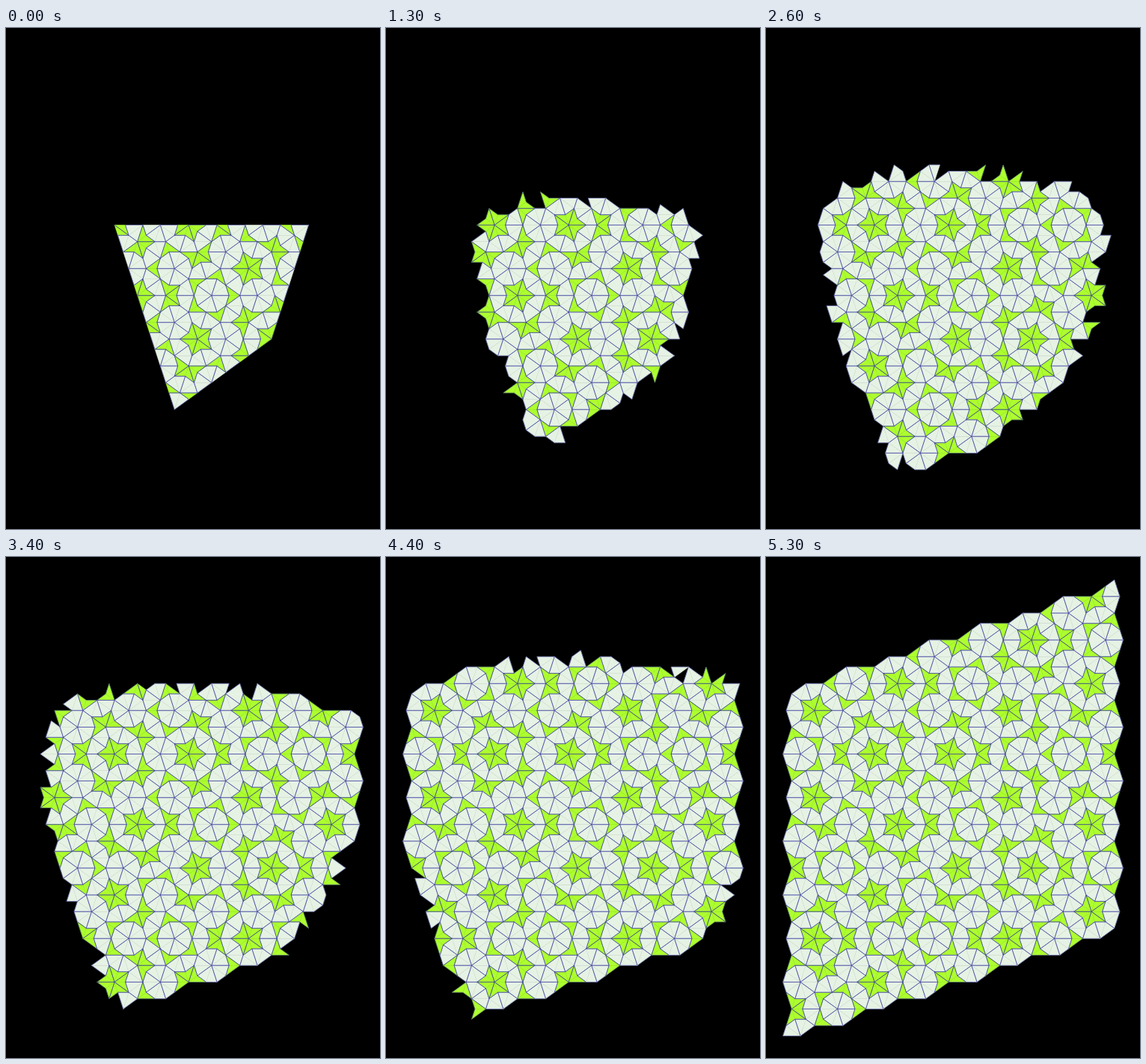
Recreate the animation shown at these times as an HTML page with a canvas. Size 500x670 px, loop 5.8 s.

```html
<!DOCTYPE html>
<html lang="en">
<head>
<meta charset="utf-8">
<title>Kite and dart tiling</title>
<style>
  html, body { margin: 0; width: 100%; height: 100%; overflow: hidden; background: #000; }
  canvas { display: block; }
</style>
</head>
<body>
<canvas id="stage" width="500" height="670"></canvas>
<script>
const ctx = document.getElementById('stage').getContext('2d');
const PHI = (1 + Math.sqrt(5)) / 2;
const CENTER = [145.1, 263.5];
const KITE_EDGE = 259.4;
const FILL = { kite: '#e5f2e4', dart: '#adff2f' };
const LOOP = 5800, HOLD = 500, STEP = 100, STEPS = 49;

const polar = (radius, degrees) => [
  CENTER[0] + radius * Math.cos(degrees * Math.PI / 180),
  CENTER[1] + radius * Math.sin(degrees * Math.PI / 180)
];
const mix = (p, q, k) => [p[0] + (q[0] - p[0]) * k, p[1] + (q[1] - p[1]) * k];

// A half tile is [kind, tip, side, axis end].
function deflate([kind, a, b, c]) {
  if (kind === 'kite') {
    const p = mix(a, b, 1 / PHI ** 2), q = mix(a, c, 1 / PHI);
    return [['dart', a, q, p], ['kite', b, p, q], ['kite', b, c, q]];
  }
  const s = mix(a, b, 1 / PHI);
  return [['kite', a, s, c], ['dart', b, c, s]];
}

function inWindow([x, y]) {
  const slanted = y + 0.325 * x;
  return x > 21 && x < 479 && slanted > 180 && slanted < 662;
}

function buildTiles() {
  const radius = KITE_EDGE * PHI ** 2;
  let halves = [];
  for (let axis = 0; axis < 360; axis += 72)
    for (const turn of [-36, 36])
      halves.push(['kite', CENTER, polar(radius, axis + turn), polar(radius, axis)]);
  for (let i = 0; i < 7; i++) halves = halves.flatMap(deflate);

  const tiles = halves
    .filter(([, ...points]) => points.every(inWindow))
    .map(([kind, a, b, c]) => ({
      kind, a, b, c,
      middle: mix(a, c, 0.5),
      centroid: mix(mix(a, c, 0.5), b, 1 / 3)
    }));

  // Both halves of a tile share the middle of its axis; keep whole tiles only.
  const key = t => t.middle.map(Math.round).join();
  const counts = {};
  for (const t of tiles) counts[key(t)] = (counts[key(t)] || 0) + 1;
  return tiles.filter(t => counts[key(t)] === 2);
}

const seedKite = [CENTER, polar(KITE_EDGE, 0), polar(KITE_EDGE, 36), polar(KITE_EDGE, 72)];

function distanceToSeed([x, y]) {
  return Math.hypot(...seedKite.map(([x1, y1], i) => {
    const [x2, y2] = seedKite[(i + 1) % 4];
    const dx = x2 - x1, dy = y2 - y1;
    return Math.max(0, ((x - x1) * dy - (y - y1) * dx) / Math.hypot(dx, dy));
  }));
}

// Growth starts along the sides of the seed, rounds off, and reaches the upper right late.
function arrival(point) {
  const dx = point[0] - 270, dy = point[1] - 365;
  return distanceToSeed(point) + 0.4 * Math.hypot(dx, dy) + 0.06 * (dx - dy);
}

const tiles = buildTiles();
const isSeed = t => distanceToSeed(t.centroid) < 0.1;
tiles.filter(isSeed).forEach(t => t.step = 0);
tiles.filter(t => !isSeed(t))
  .sort((s, t) => arrival(s.middle) - arrival(t.middle))
  .forEach((t, i, list) => t.step = Math.ceil((i + 1) / list.length * STEPS));

function trace(...points) {
  ctx.beginPath();
  for (const p of points) ctx.lineTo(...p);
}

function draw(step) {
  const visible = tiles.filter(t => t.step <= step);
  ctx.fillStyle = '#000';
  ctx.fillRect(0, 0, 500, 670);
  ctx.lineJoin = 'round';
  ctx.lineWidth = 0.5;

  // A hairline in the fill colour closes the seam between two halves.
  for (const { kind, a, b, c } of visible) {
    ctx.fillStyle = ctx.strokeStyle = FILL[kind];
    trace(a, b, c);
    ctx.closePath();
    ctx.fill();
    ctx.stroke();
  }

  ctx.strokeStyle = '#30309a';
  for (const { a, b, c } of visible) {
    trace(a, b, c);
    ctx.stroke();
  }
}

let shownStep = -1;
function frame() {
  const time = performance.now() % LOOP;
  const step = time < HOLD ? 0 : Math.min(STEPS, Math.floor((time - HOLD) / STEP) + 1);
  if (step !== shownStep) draw(shownStep = step);
  requestAnimationFrame(frame);
}
frame();
</script>
</body>
</html>
```
